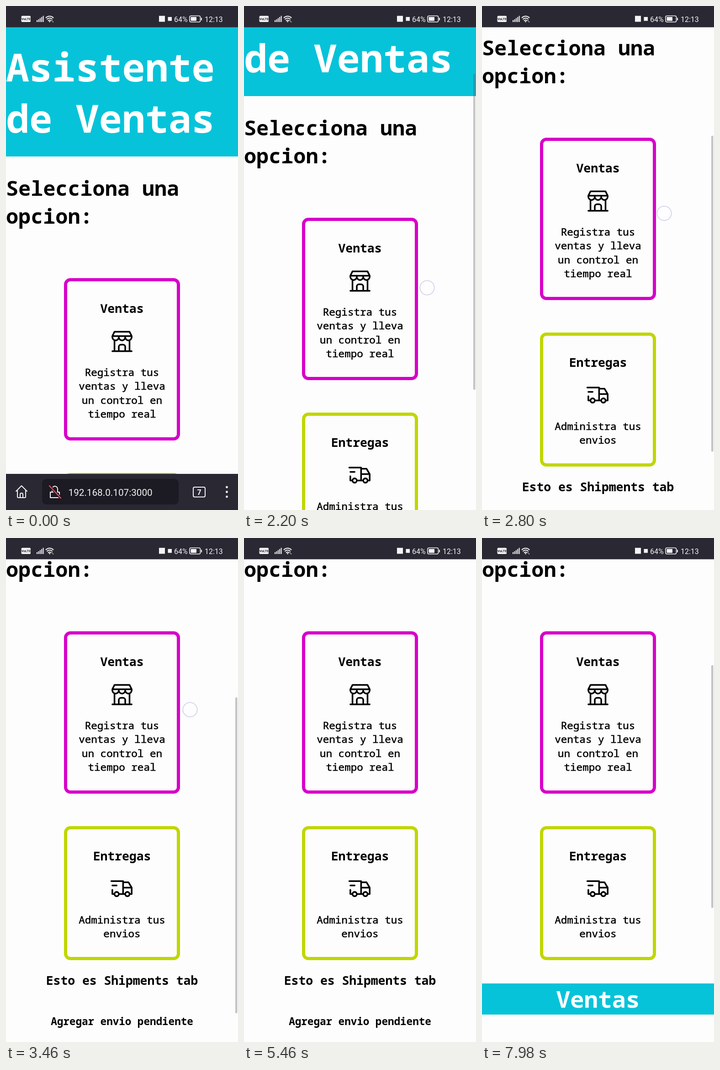
Write an HTML page that moves like this. It is 508 px wide and 1102 px high and loops after 8 s.

```html
<!DOCTYPE html>
<html lang="es">
<head>
<meta charset="utf-8">
<title>Asistente de Ventas</title>
<style>
  html, body { margin: 0; width: 100%; height: 100%; overflow: hidden; background: #fdfdfd; }
  svg { display: block; width: 100vw; height: 100vh; }
  #page { font: 22.58px "Noto Sans Mono", "DejaVu Sans Mono", monospace; }
  .h1, .h2, .h3, .h4, .banner { font-weight: 700; }
  .h1 { font-size: 84.67px; fill: #fff; }
  .h2 { font-size: 45.15px; }
  .h3 { font-size: 26.4px; }
  .banner { font-size: 50.8px; fill: #fff; }
  .mid { text-anchor: middle; }
  .body { stroke: #000; stroke-width: .55; }
  .card { fill: none; stroke-width: 7; }
  .icon { fill: none; stroke: #000; stroke-width: 1.5; stroke-linecap: round; stroke-linejoin: round; }
  .ui { font-family: Roboto, "Noto Sans", sans-serif; fill: #f4f4f6; }
  .line { fill: none; stroke: #f4f4f6; stroke-width: 2; stroke-linecap: round; stroke-linejoin: round; }
</style>
</head>
<body>
<svg viewBox="0 0 508 1102" preserveAspectRatio="none">
  <rect width="508" height="1102" fill="#fdfdfd"/>

  <g id="page">
    <rect y="46" width="508" height="283" fill="#06c3d9"/>
    <text class="h1" y="165">Asistente</text>
    <text class="h1" y="277">de Ventas</text>
    <text class="h2" y="415">Selecciona una</text>
    <text class="h2" y="476">opcion:</text>

    <rect class="card" x="130.5" y="598.5" width="247" height="348" rx="10.5" stroke="#d700c9"/>
    <path class="icon" transform="translate(225.8 705.3) scale(2.352)"
      d="M3 21h18M3 7v1a3 3 0 0 0 6 0v-1m0 1a3 3 0 0 0 6 0v-1m0 1a3 3 0 0 0 6 0v-1H3l2-4h14l2 4M5 21V10.85M19 21V10.85M9 21v-4a2 2 0 0 1 2-2h2a2 2 0 0 1 2 2v4"/>
    <g class="mid">
      <text class="h3" x="254" y="671">Ventas</text>
      <g class="body">
        <text x="254" y="808.5">Registra tus</text>
        <text x="254" y="839">ventas y lleva</text>
        <text x="254" y="869.7">un control en</text>
        <text x="254" y="900.4">tiempo real</text>
      </g>
    </g>

    <rect class="card" x="130.5" y="1024.5" width="247" height="286" rx="10.5" stroke="#c0d600"/>
    <path class="icon" transform="translate(225.8 1129.6) scale(2.352)"
      d="M5 17a2 2 0 1 0 4 0a2 2 0 1 0-4 0M15 17a2 2 0 1 0 4 0a2 2 0 1 0-4 0M5 17H3v-4M2 5h11v12m-4 0h6m4 0h2v-6h-8m0-5h5l3 5M3 9h4"/>
    <g class="mid">
      <text class="h3" x="254" y="1096">Entregas</text>
      <g class="body">
        <text x="254" y="1233.5">Administra tus</text>
        <text x="254" y="1264">envios</text>
      </g>
      <g id="shipments">
        <text class="h3" x="254" y="1368">Esto es Shipments tab</text>
        <text class="h4" x="254" y="1456">Agregar envio pendiente</text>
      </g>
      <g id="sales">
        <rect y="1365" width="508" height="68" fill="#06c3d9"/>
        <text class="banner" x="254" y="1418">Ventas</text>
      </g>
    </g>
  </g>

  <rect id="bar" x="502" width="4.5" rx="2.2" fill="#50505a" fill-opacity=".33"/>
  <circle id="touch" r="15.7" fill="#fff" fill-opacity=".55" stroke="#d2d3ea" stroke-width="1.8"/>

  <g id="toolbar">
    <rect y="1023" width="508" height="79" fill="#2a2833"/>
    <rect x="79" y="1034" width="299" height="56" rx="9" fill="#1c1a23"/>
    <path class="line" d="M22 1061l12-12l12 12M25 1059v14a2 2 0 0 0 2 2h14a2 2 0 0 0 2-2v-14M31 1075v-7a3 3 0 0 1 6 0v7"/>
    <path class="line" d="M97 1063h20v12h-20zM101 1063v-7a6 6 0 0 1 12 0v7"/>
    <path d="M95 1049l25 27" stroke="#1c1a23" stroke-width="6"/>
    <path d="M95 1049l25 27" stroke="#f0485c" stroke-width="2.4" stroke-linecap="round"/>
    <text class="ui" x="136.5" y="1071" font-size="20.7">192.168.0.107:3000</text>
    <rect class="line" x="410" y="1052" width="26" height="21.5" rx="3"/>
    <text class="ui mid" x="423" y="1068.5" font-size="16" font-weight="700">7</text>
    <g fill="#f4f4f6">
      <circle cx="483.5" cy="1052" r="2.4"/>
      <circle cx="483.5" cy="1062.5" r="2.4"/>
      <circle cx="483.5" cy="1073" r="2.4"/>
    </g>
  </g>

  <g id="status" class="ui">
    <rect width="508" height="46.5" fill="#2a2833"/>
    <rect x="33.5" y="21.5" width="20.5" height="13.5" rx="2.5"/>
    <text class="mid" x="43.8" y="31" font-size="7.2" font-weight="700" style="fill:#2a2833">VoLTE</text>
    <path d="M68 35v-4M71.4 35v-6M74.8 35v-8.5M78.2 35v-11M81.6 35v-13.5" stroke="#f4f4f6" stroke-width="2"/>
    <path class="line" d="M87.5 25.5a11.5 11.5 0 0 1 16 0M90 28.8a8 8 0 0 1 11 0M92.6 32a4.5 4.5 0 0 1 5.8 0"/>
    <circle cx="95.5" cy="34" r="1.5"/>
    <path d="M99.5 33l1.5-2l1.5 2zM101.5 34h3l-1.5 2z"/>
    <rect x="335" y="21.5" width="13" height="13"/>
    <rect x="354.5" y="24" width="8.5" height="8.5"/>
    <text x="368" y="34.5" font-size="16">64%</text>
    <rect class="line" x="402" y="21.5" width="23.5" height="13.5" rx="3" style="stroke-width:1.6"/>
    <rect x="404.5" y="24" width="12.5" height="8.5" rx="1"/>
    <rect x="427" y="25.5" width="2" height="6" rx="1"/>
    <text x="435" y="34.5" font-size="16">12:13</text>
  </g>
</svg>

<script>
const $ = id => document.getElementById(id);
const set = (id, attrs) => {
  for (const k in attrs) $(id).setAttribute(k, attrs[k]);
};
const clamp = x => Math.max(0, Math.min(1, x));
const LOOP = 8000, TAP = 7000, SWITCH = 7560;

// drag keys: time, scroll, scroll speed (px/ms), finger x
const keys = [
  [1660, 0, 0, 401],
  [2200, 132, .27, 401],
  [2800, 307, .22, 399],
  [3400, 391, 0, 403]
];

function drag(t) {
  let i = 0;
  while (i < keys.length - 2 && t > keys[i + 1][0]) i++;
  const [t0, s0, v0, x0] = keys[i], [t1, s1, v1, x1] = keys[i + 1];
  const d = t1 - t0, u = clamp((t - t0) / d), w = 1 - u;
  return {
    scroll: s0 * w * w * (1 + 2 * u) + s1 * u * u * (3 - 2 * u) + d * u * w * (v0 * w - v1 * u),
    x: x0 + (x1 - x0) * u
  };
}

function draw(t) {
  const { scroll, x } = drag(t);
  const switched = t >= SWITCH;
  const tapped = t >= TAP && t < TAP + 100;
  const dragging = t >= 1660 && t < 3700;

  // whole pixels keep the text and borders crisp
  set("page", { transform: `translate(0 ${-Math.round(scroll)})` });
  set("toolbar", { transform: `translate(0 ${Math.min(80, Math.round(scroll))})` });
  set("shipments", { visibility: switched ? "hidden" : "visible" });
  set("sales", { visibility: switched ? "visible" : "hidden" });
  set("touch", {
    cx: tapped ? 257.5 : x,
    cy: tapped ? 347 : 739 - scroll * .93,
    opacity: tapped || dragging ? 1 : 0
  });
  set("bar", {
    y: switched ? 278 : 46 + scroll * .773,
    height: switched ? 531 : 691,
    opacity: switched ? 1 : scroll > 0 ? clamp((4400 - t) / 300) : 0
  });
}

function tick() {
  draw(performance.now() % LOOP);
  requestAnimationFrame(tick);
}
tick();
</script>
</body>
</html>
```
